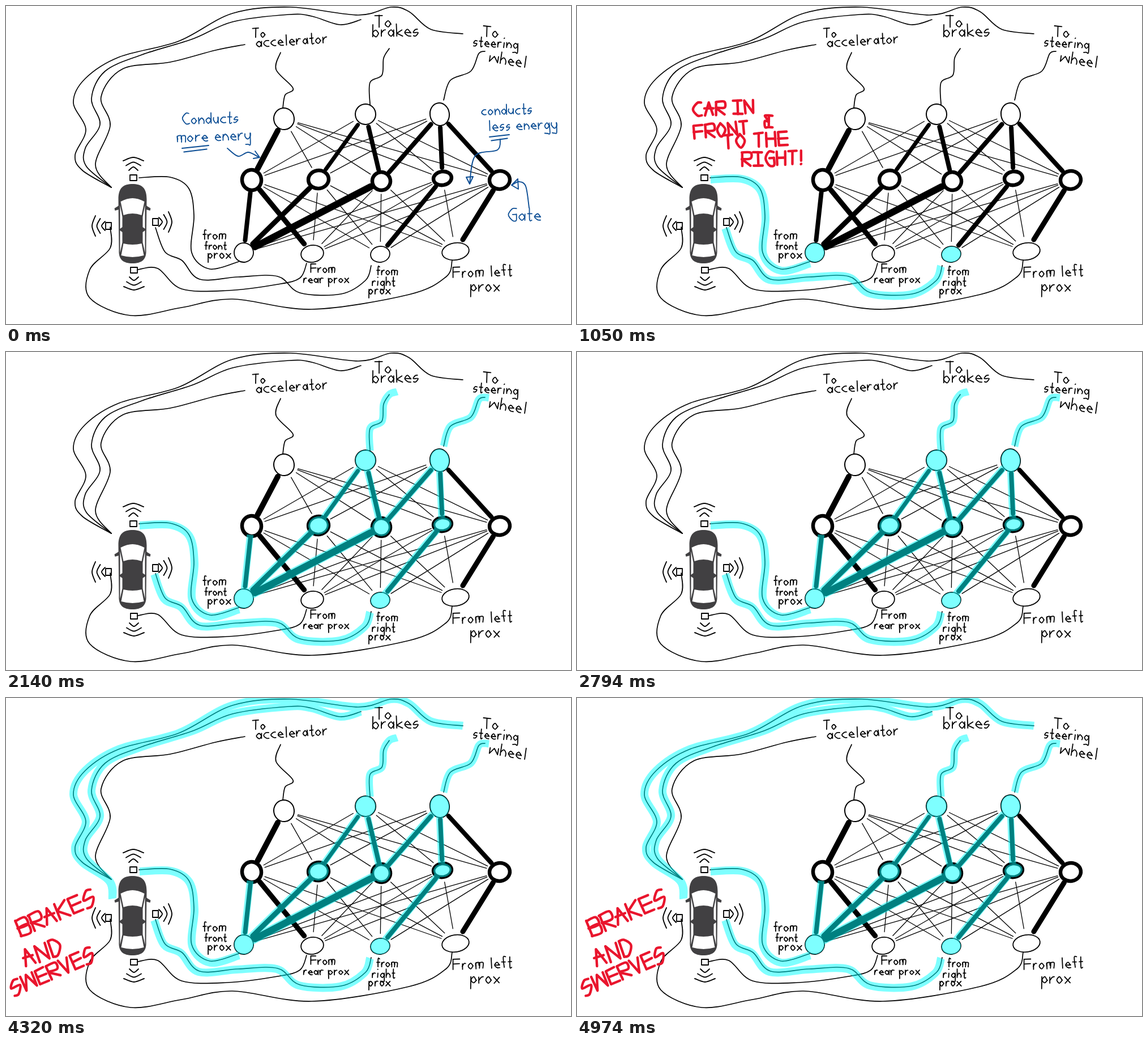
An HTML page with a canvas for the animation above (5410 ms loop, 998 by 561 pixels).

```html
<!DOCTYPE html>
<html lang="en">
<head>
<meta charset="utf-8">
<title>Proximity network</title>
<style>
html, body { margin: 0; width: 100%; height: 100%; overflow: hidden; background: #fff; }
canvas { display: block; width: 998px; height: 561px; }
</style>
</head>
<body>
<canvas id="stage" width="998" height="561" role="img" aria-label="A car's proximity sensors feed a network of gates that controls accelerator, brakes and steering wheel"></canvas>
<script>
const W = 998, H = 561, LOOP = 5410;
const stage = document.getElementById('stage').getContext('2d');
const BLACK = '#000', BLUE = '#0b4d94', RED = '#e9152d', CYAN = '#0ff', DARK = '#414042';

let g, seed = 7;
const jitter = amount => {
  seed = seed * 16807 % 2147483647;
  return (seed / 2147483647 - .5) * amount;
};

// Line through [x, y, x, y, ...]; bend 0 gives straight pieces
function curve(p, width = 1.7, color = BLACK, cap = 'round', bend = 1 / 6) {
  const last = p.length / 2 - 1;
  const at = (i, k) => p[Math.max(0, Math.min(last, i)) * 2 + k];
  const lead = (i, sign, k) => at(i, k) + sign * bend * (at(i + 1, k) - at(i - 1, k));
  g.beginPath();
  g.moveTo(p[0], p[1]);
  for (let i = 0; i < last; i++) {
    g.bezierCurveTo(lead(i, 1, 0), lead(i, 1, 1), lead(i + 1, -1, 0), lead(i + 1, -1, 1), at(i + 1, 0), at(i + 1, 1));
  }
  g.strokeStyle = color;
  g.lineWidth = width;
  g.lineCap = cap;
  g.stroke();
}
const line = (p, width, color) => curve(p, width, color, 'round', 0);
const mark = (p, width = 13) => curve(p, width, CYAN, 'butt');
const shift = (p, dx, dy) => p.map((v, i) => v + (i % 2 ? dy : dx));

/* Handwriting: each letter is a list of strokes over a 3-column grid,
   abc = top, def = middle, mno = half of the x-height, ghi = baseline,
   jkl = descender. A leading ~ makes the stroke round. */
const GRID = 'abcdefmnoghijkl', ROWS = [17, 9, 4.5, 0, -8];
const LETTERS = {
  a: '~oemho fi', b: 'ag ~oemho', c: '~femhi', d: 'ci ~oemho', e: 'mo ~oemhi', f: '~cbh df',
  g: '~oemho ~flkj', h: 'ag ~meoi', i: 'eh bb', k: 'ag fmi', l: 'bh', m: 'dg ~mdeh ~nefi',
  n: 'dg ~meoi', o: '~oemho', p: 'dj ~oemho', r: 'dg ~mef', s: '~femohg', t: '~bhi df',
  u: '~dmhof fi', w: 'dgeif', x: 'di gf', y: '~dmhof ~flkj',
  A: 'gbi df', B: 'ga ~acfd ~dfig', C: '~cbdhi', D: 'ga ~abfhg', E: 'cagi df', F: 'gac df',
  G: '~cbdhif ef', H: 'ga ic df', I: 'ac bh gi', K: 'ga cdi', N: 'gaic', O: '~bdhfb',
  R: 'ga ~acfd di', S: '~cbdfhg', T: 'ac bh', V: 'ahc', W: 'agbic',
  '&': '~cbaedghi bh', '!': 'bn hh', ' ': ''
};

function column(ch) {
  if ('il!'.includes(ch)) return 1.5;
  if (ch === ' ') return 2;
  if ('frst'.includes(ch)) return 3;
  if (ch === 'W') return 7;
  return 'mw'.includes(ch) ? 6 : ch < 'a' ? 5.5 : 4;
}

function write(text, x, y, size, tilt = 0, color = BLACK, width = 1.8) {
  g.save();
  g.translate(x, y);
  g.rotate(tilt);
  let left = 0;
  for (const ch of text) {
    const step = column(ch);
    for (const stroke of LETTERS[ch].split(' ')) {
      const points = [...stroke.replace('~', '')].flatMap(c => {
        const k = GRID.indexOf(c);
        return [(left + k % 3 * step + jitter(1)) * size, (jitter(1) - ROWS[Math.floor(k / 3)]) * size];
      });
      if (points.length) (stroke[0] === '~' ? curve : line)(points, width, color);
    }
    left += step * 2 + 4;
  }
  g.restore();
}

// Wires, each through a few key points
const steerLine = [186, 320, 135, 290, 122, 263, 141, 218, 119, 170, 140, 128, 200, 90, 305, 62,
  400, 13, 502, 2, 622, 16, 680, 2, 712, 10, 750, 41, 807, 49];
const brakeLine = [186, 320, 142, 283, 140, 251, 166, 209, 151, 163, 175, 115, 240, 86, 330, 58,
  400, 28, 500, 15, 540, 18, 590, 33, 627, 24];
const gasLine = [186, 320, 158, 280, 184, 211, 168, 160, 206, 111, 290, 99, 370, 78, 422, 68];
const gasOut = [485, 82, 477, 112, 507, 145, 493, 157, 489, 180];
const brakeOut = [677, 75, 667, 92, 664, 122, 643, 135, 643, 174];
const steerOut = [846, 80, 835, 84, 821, 115, 785, 131, 773, 166];
const frontLine = [235, 303, 290, 302, 323, 322, 332, 370, 328, 435, 360, 464, 411, 451];
const rightLine = [264, 391, 281, 434, 311, 449, 342, 482, 410, 478, 480, 477, 519, 506, 592, 508, 635, 484, 645, 458];
const rearLine = [233, 465, 268, 463, 310, 499, 390, 502, 480, 491, 519, 480, 531, 454];
const leftLine = [184, 390, 184, 427, 148, 465, 148, 515, 220, 546, 310, 532, 400, 517, 540, 535, 712, 509, 777, 478, 788, 449];

const drawWires = () => [steerLine, brakeLine, gasLine, gasOut, brakeOut, steerOut,
  frontLine, rightLine, rearLine, leftLine].forEach(p => curve(p));

// Network: nodes are [x, y, rx, ry]; weight 0 is a faint link
const ins = [[420, 435, 17, 17], [541, 437, 20, 15], [661, 438, 17, 14], [794, 433, 24, 15]];
const gates = [[434, 307, 17, 18], [552, 306, 18, 16], [663, 309, 16, 16], [771, 304, 16, 12], [872, 307, 18, 16]];
const outs = [[491, 199, 18, 19], [635, 191, 18, 18], [766, 191, 17, 20]];
const lowWeights = [[8, 9, 12, 0, 0], [9, 0, 0, 0, 0], [0, 0, 0, 8, 0], [0, 0, 0, 0, 9]];
const highWeights = [[10, 0, 0], [0, 7, 0], [0, 8, 8], [0, 0, 8], [0, 0, 8]];
const lit = [ins[0], ins[2], gates[1], gates[2], gates[3], outs[1], outs[2]];

function oval([x, y, rx, ry], width, fill) {
  g.beginPath();
  g.ellipse(x, y, rx, ry, -.15, 0, 7);
  if (fill) { g.fillStyle = fill; g.fill(); return; }
  g.strokeStyle = BLACK;
  g.lineWidth = width;
  g.stroke();
}

// Straight link between two nodes, stopping short of both rims
function between(a, b, gap) {
  const angle = Math.atan2(b[1] - a[1], b[0] - a[0]);
  const rim = (n, sign) => {
    const r = sign * ((n[2] + n[3]) / 2 + gap);
    return [n[0] + r * Math.cos(angle), n[1] + r * Math.sin(angle)];
  };
  return [...rim(a, 1), ...rim(b, -1)];
}

function eachLink(visit) {
  lowWeights.forEach((row, i) => row.forEach((w, j) => visit(ins[i], gates[j], w)));
  highWeights.forEach((row, i) => row.forEach((w, j) => visit(gates[i], outs[j], w)));
}

function drawNet() {
  eachLink((a, b, w) => line(between(a, b, w ? 5 : 7), w || 1.3));
  ins.forEach(n => oval(n, 1.8));
  gates.forEach(n => oval(n, 6.5));
  outs.forEach(n => oval(n, 2));
}

// Box with three waves spreading towards the given angle
function sensor(x, y, angle, first) {
  g.save();
  g.translate(x, y);
  g.rotate(angle);
  g.strokeStyle = BLACK;
  g.lineWidth = 1.8;
  g.strokeRect(-6, -5, 12, 10);
  for (let i = 0; i < 3; i++) {
    const half = 8 + 5 * i, top = -first - 8.5 * i;
    curve([-half, top + 6, 0, top, half, top + 6], 1.9);
  }
  g.restore();
}

function drawCar() {
  g.save();
  g.translate(223.5, 0);
  for (const side of [1, -1]) {
    g.scale(side, 1);
    g.fillStyle = DARK;
    g.fill(new Path2D('M-.5 314C16 314 25 320 25 341L24 430C25 447 17 454-.5 454Z'));
    g.fill(new Path2D('M24 352L32 357 31 361 24 359Z'));
    g.fillStyle = '#fff';
    g.fill(new Path2D('M-.5 339Q10 339 21 345L16 369Q8 366-.5 366Z'));
    g.fill(new Path2D('M-.5 421Q8 421 16 419L20 440Q10 443-.5 443Z'));
    g.fill(new Path2D('M22 351L18 372 18 390 22 393Z'));
    g.fill(new Path2D('M22 396L18 399 18 417 22 435Z'));
  }
  g.restore();
  sensor(225, 303, 0, 19);
  sensor(264, 381, Math.PI / 2, 12);
  sensor(226, 466, Math.PI, 18);
  sensor(181, 388, -Math.PI / 2, 12);
}

function drawLabels() {
  write('To', 436, 55, .93);
  write('accelerator', 443, 72, 1.06, -.06);
  write('To', 652, 37, 1.2);
  write('brakes', 648, 54, 1.24, -.02);
  write('To', 843, 54, 1.1, .05);
  write('steering', 826, 70, .96, .06);
  write('wheel', 854, 98, 1.17, .16);
  write('from', 348, 411, .9);
  write('front', 351, 429, .76);
  write('prox', 357, 445, .94);
  write('From', 538, 470, .87);
  write('rear prox', 526, 488, .84);
  write('from', 655, 474, .82);
  write('right', 647, 493, .85);
  write('prox', 641, 508, .89);
  write('From left', 790, 479, 1.08, -.04);
  write('prox', 821, 503, 1.2);
}

function drawNotes() {
  const ink = p => curve(p, 1.9, BLUE);
  const head = p => line([...p, p[0], p[1]], 1.9, BLUE);
  write('Conducts', 312, 208, 1.07, -.03, BLUE);
  write('more enery', 303, 240, 1.15, -.04, BLUE);
  write('conducts', 840, 192, 1, -.03, BLUE);
  write('less energy', 853, 220, 1.06, -.04, BLUE);
  write('Gate', 888, 379, 1.25, -.03, BLUE);
  for (const drop of [0, 6.5]) {
    ink([311 + drop / 2, 251 + drop, 358 - drop / 2, 246 + drop]);
    ink([854 + drop / 2, 231 + drop, 889 - drop / 2, 227 + drop]);
  }
  ink([391, 251, 410, 265, 428, 258, 447, 267]);
  line([440, 256, 448, 267, 437, 269], 1.9, BLUE);
  ink([873, 235, 868, 254, 829, 264, 819, 312]);
  head([813, 302, 825, 301, 819, 314]);
  ink([924, 356, 918, 318, 906, 310, 895, 315]);
  head([893, 316, 904, 305, 905, 323]);
}

function glowSensors() {
  mark(shift(frontLine, 1, 3), 14);
  mark(shift(rightLine, -2, 1), 14);
  lit.slice(0, 2).forEach(n => oval(n, 0, CYAN));
}

function glowNet() {
  eachLink((a, b, w) => {
    if (w && lit.includes(a)) mark(shift(between(a, b, -2), -1, 0), w + 4);
  });
  lit.forEach(n => oval(n, 0, CYAN));
  mark([691, 70, ...brakeOut]);
  mark([853, 81, ...steerOut]);
}

function glowOutputs() {
  mark([188, 354, 182, 322, ...steerLine.slice(2)], 14);
  mark([188, 354, 184, 325, ...brakeLine.slice(2)], 14);
}

const shout = (text, x, y, size, tilt) => write(text, x, y, size, tilt, RED, 4.4);

function warn() {
  shout('CAR IN', 206, 194, 1.34, -.05);
  shout('FRONT', 208, 234, 1.34, -.09);
  shout('&', 332, 214, 1.2, 0);
  shout('TO THE', 260, 252, 1.42, -.06);
  shout('RIGHT!', 292, 282, 1.36, -.03);
}

function react() {
  shout('BRAKES', 27, 420, 1.68, -.4);
  shout('AND', 35, 474, 1.72, -.34);
  shout('SWERVES', 15, 525, 1.5, -.41);
}

function record(...parts) {
  const c = document.createElement('canvas');
  c.width = W;
  c.height = H;
  g = c.getContext('2d');
  g.lineJoin = 'round';
  parts.forEach(part => part());
  return c;
}

const base = record(drawWires, drawNet, drawCar, drawLabels);
const scenes = [
  { from: 0, ink: record(drawNotes) },
  { from: 1050, glow: record(glowSensors), ink: record(warn) },
  { from: 2140, glow: record(glowSensors, glowNet) },
  { from: 3230, glow: record(glowSensors, glowNet, glowOutputs) },
  { from: 4320, glow: record(glowSensors, glowNet, glowOutputs), ink: record(react) }
];

const start = performance.now();
function frame() {
  const t = (performance.now() - start) % LOOP;
  const scene = scenes.filter(s => t >= s.from).pop();
  stage.fillStyle = '#fff';
  stage.fillRect(0, 0, W, H);
  stage.drawImage(base, 0, 0);
  if (scene.glow) {
    stage.globalAlpha = .5;
    stage.drawImage(scene.glow, 0, 0);
    stage.globalAlpha = 1;
  }
  if (scene.ink) stage.drawImage(scene.ink, 0, 0);
  requestAnimationFrame(frame);
}
frame();
</script>
</body>
</html>
```
